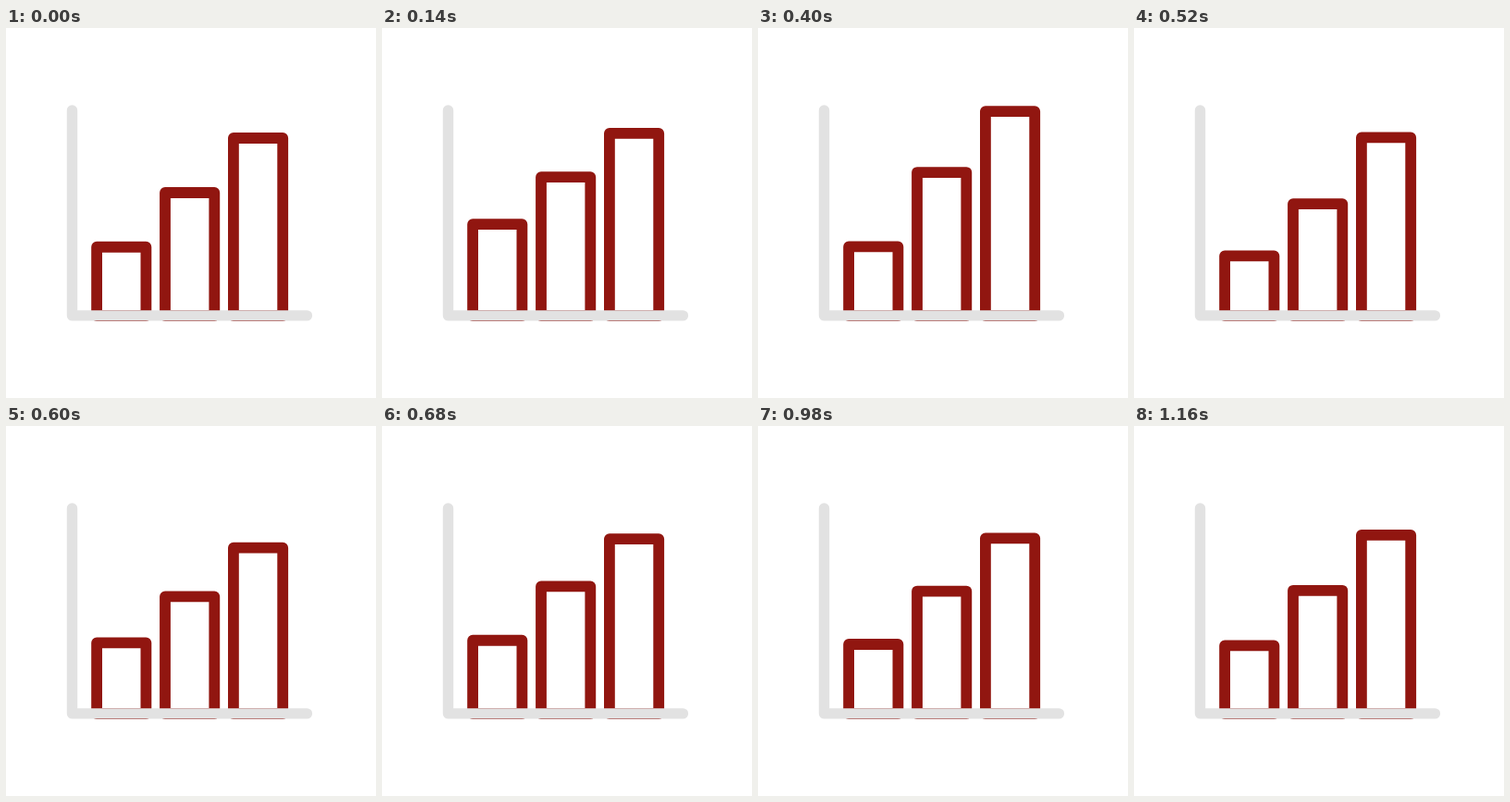
Write an HTML page that moves like this. It is 400 px wide and 400 px high and loops after 1200 ms.

```html
<!DOCTYPE html>
<html lang="en">
<head>
<meta charset="utf-8">
<title>Bar chart</title>
<style>
  html, body { margin: 0; width: 100%; height: 100%; overflow: hidden; background: #fff; }
  svg { display: block; width: 100%; height: 100%; }
  path { fill: none; stroke-linecap: round; stroke-linejoin: round; }
  .bar { stroke: #911610; stroke-width: 11.8; }
  .axis { stroke: #e2e2e2; stroke-width: 11.4; }
</style>
</head>
<body>
<svg viewBox="0 0 400 400">
  <path class="bar"/>
  <path class="bar"/>
  <path class="bar"/>
  <path class="axis" d="M71.5 89V310.9H325.4"/>
</svg>
<script>
const LOOP = 1200, BASE = 311, WIDTH = 53.3;
const RISE = 29.5, PEAK = 235, LANDING = 402;
const bars = [
  { x: 98.1, top: 237, delay: 0 },
  { x: 172, top: 178, delay: 60 },
  { x: 245.9, top: 119, delay: 120 },
];
const paths = document.querySelectorAll('.bar');

// Ease up, drop back, then ring out as a damped spring.
function lift(t) {
  if (t <= 0) return 0;
  if (t < PEAK) return RISE * (1 - (1 - t / PEAK) ** 2);
  if (t < LANDING) return RISE * (1 - ((t - PEAK) / (LANDING - PEAK)) ** 3);
  const s = (t - LANDING) / 1000;
  return -18.2 * Math.sin(2 * Math.PI * 2.8 * s) * Math.exp(-4.4 * s);
}

function draw(now) {
  const t = now % LOOP;
  bars.forEach(({ x, top, delay }, i) => {
    const y = top - lift(t - delay);
    paths[i].setAttribute('d', `M${x} ${BASE}V${y}h${WIDTH}V${BASE}Z`);
  });
}

const start = performance.now();
function tick() {
  draw(performance.now() - start);
  requestAnimationFrame(tick);
}
tick();
</script>
</body>
</html>
```
